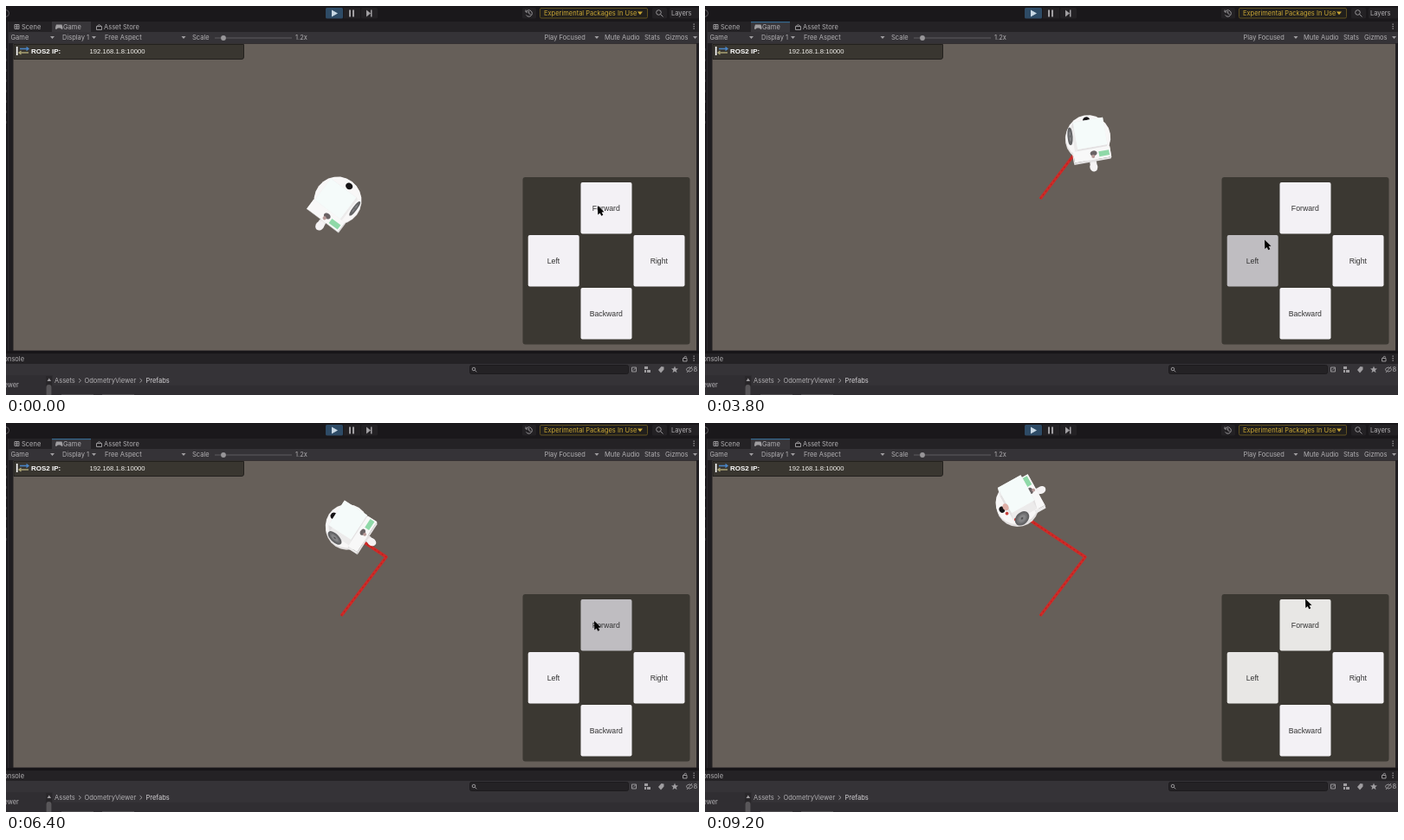
Recreate the animation shown at these times as an HTML page. Size 800x450 px, loop 9.3 s.

```html
<!DOCTYPE html>
<html lang="en">
<head>
<meta charset="utf-8">
<title>Robot odometry viewer</title>
<style>
html, body { margin: 0; width: 100%; height: 100%; overflow: hidden; background: #1a181b; }
svg { display: block; width: 800px; height: 450px; }
text { font: 7.5px Inter, sans-serif; fill: #b2b0b3; white-space: pre; }
.pad text { font: 8.7px "Liberation Sans", Arial, sans-serif; fill: #323232; text-anchor: middle; }
.ip text { font: 7.7px "Liberation Sans", Arial, sans-serif; fill: #f2f0ec; }
.ip .bold { font-weight: bold; font-size: 8px; fill: #fff; }
.line { fill: none; stroke: #989699; stroke-width: 1; }
.icon { fill: #a09ea1; }
</style>
</head>
<body>
<svg viewBox="0 0 800 450">
  <!-- top bar -->
  <rect width="800" height="450" fill="#1a181b"/>
  <path class="line" d="M0 4.500Q3.500 5 3.500 8.500T0 12.500" opacity=".5"/>
  <rect x="369" y="2" width="20" height="12.500" rx="1.500" fill="#2e4b66"/>
  <rect x="390" y="2" width="19" height="12.500" fill="#232124"/>
  <rect x="410" y="2" width="19" height="12.500" rx="1.500" fill="#232124"/>
  <path fill="#c9d8e4" d="M376 4.500L383 8.500L376 12.500Z"/>
  <path class="icon" d="M396 4.500h2v8h-2zM400 4.500h2v8h-2zM416 4.500L421 8.500L416 12.500ZM421 4.500h1.500v8h-1.500z"/>
  <rect x="596" y="2" width="16" height="12.500" rx="1.500" fill="#232124"/>
  <path class="line" d="M600.500 6.500A3.700 3.700 0 1 1 600.500 10.500M600 4.500v2.500h2.500M603.700 6v2.700l2 1"/>
  <rect x="616.500" y="2.500" width="124" height="11.500" rx="1.500" fill="#211f1c" stroke="#5f5020"/>
  <text x="621" y="11" style="fill:#c9a634">Experimental Packages In Use</text>
  <path fill="#c9a634" d="M729 6.500h6l-3 3.800z"/>
  <rect x="746" y="2" width="17" height="12.500" rx="1.500" fill="#232124"/>
  <g class="line"><circle cx="753.500" cy="7.500" r="2.800"/><path d="M755.500 9.500l3 3"/></g>
  <rect x="766" y="2" width="34" height="12.500" rx="1.500" fill="#232124"/>
  <text x="768" y="11">Layers</text>

  <!-- view tabs -->
  <rect x="3" y="18" width="797" height="12" fill="#242225"/>
  <rect x="53" y="18" width="45" height="12" fill="#38363a"/>
  <rect id="focus" x="53" y="18" width="45" height="1.200" fill="#36698f"/>
  <path class="line" d="M10 21.500h5v5h-5zM12.500 21.500v5M10 24h5" stroke-width=".8"/>
  <text x="18" y="27">Scene</text>
  <path class="icon" d="M58 21.500h6.500q2 5.500 0 5.500l-2-1.500h-2.500l-2 1.500q-2 0 0-5.500z"/>
  <text x="66" y="27">Game</text>
  <path class="line" d="M104.500 23.500h6v4h-6zM105.500 23.500q2-4 4 0"/>
  <text x="113" y="27">Asset Store</text>
  <path class="icon" d="M793.500 20.500h1.300v1.300h-1.300zm0 2.500h1.300v1.300h-1.300zm0 2.500h1.300v1.300h-1.300z"/>

  <!-- game toolbar -->
  <rect x="3" y="30" width="797" height="13" fill="#353337"/>
  <path class="icon" d="M51 35h5l-2.500 3zM99 35h5l-2.500 3zM202.500 35h5l-2.500 3zM679.500 35h5l-2.500 3zM793 35h5l-2.500 3z"/>
  <text x="5.500" y="39.200">Game</text>
  <text x="65" y="39.200">Display 1</text>
  <text x="114" y="39.200">Free Aspect</text>
  <text x="215" y="39.200">Scale</text>
  <path d="M241 37h89" stroke="#5f5d60" stroke-width="1.200"/>
  <circle cx="251" cy="37" r="2.900" fill="#989699"/>
  <text x="334" y="39.200">1.2x</text>
  <text x="621.500" y="39.200">Play Focused</text>
  <text x="691" y="39.200">Mute Audio</text>
  <text x="737" y="39.200">Stats</text>
  <text x="761" y="39.200">Gizmos</text>
  <path d="M2.500 18v381" stroke="#2c2a2e"/>
  <path d="M0 49v90" stroke="#4e4c50" stroke-dasharray="3 9"/>

  <!-- game view -->
  <rect x="3" y="43" width="797" height="357" fill="#201e21"/>
  <rect x="8.500" y="43.700" width="788.500" height="354.800" fill="#665f59"/>
  <g class="ip">
    <path d="M9 44.500H274.500V59q0 2.500-2.500 2.500H9z" fill="#393630" stroke="#23211e"/>
    <path d="M12.700 47v10" stroke="#fff" stroke-width="1.600"/>
    <path d="M16 49.500h10m-2.500-2l2.500 2-2.500 2" fill="none" stroke="#4a86c8" stroke-width="1.300"/>
    <path d="M26 54H15m2.500-2l-2.500 2 2.500 2" fill="none" stroke="#a9a374" stroke-width="1.300"/>
    <text class="bold" x="29" y="54.500">ROS2 IP:</text>
    <text x="96.500" y="54.500">192.168.1.8:10000</text>
  </g>

  <g fill="none" stroke-linejoin="round">
    <path id="trail" stroke="#d02a27" stroke-width="3.400"/>
    <path id="marks" stroke="#b42321" stroke-width="1.200" stroke-dasharray="2 3"/>
  </g>
  <g id="robot"></g>

  <g class="pad">
    <rect x="596.500" y="198" width="193" height="193.500" rx="3" fill="#3b3832"/>
    <g id="keys"></g>
  </g>
  <path id="cursor" fill="#050505" d="M0 0L7.500 7.200L4.600 7.600L6.300 10.800L4.300 11.800L2.700 8.600L.3 10.500Z"/>

  <!-- lower panels -->
  <rect y="399" width="800" height="3" fill="#171518"/>
  <rect y="402" width="800" height="12" fill="#242225"/>
  <text x="-8" y="411">Console</text>
  <path class="line" d="M781.500 407.500h4.500v3.500h-4.500zM782.500 407.500q1-4 3.500-1"/>
  <path class="icon" d="M793.500 404.500h1.300v1.300h-1.300zm0 2.500h1.300v1.300h-1.300zm0 2.500h1.300v1.300h-1.300z"/>
  <rect y="414" width="800" height="13" fill="#353337"/>
  <rect x="535.500" y="415.500" width="183" height="10" rx="2" fill="#242225" stroke="#1c1a1d"/>
  <g class="line"><circle cx="540" cy="420" r="1.800"/><path d="M541.300 421.300l2 2"/></g>
  <path class="line" d="M722.500 418h5v5h-5zM724 421.500l3-3"/>
  <path class="icon" d="M737 417h4v3h-4zM740 421h4v3h-4zM737 421h2v3h-2zM753 421l3.500-4 3 .5v3l-3.500 4zM772 416.500l1.100 2.700 2.900.2-2.200 1.900.7 2.900-2.500-1.600-2.500 1.600.7-2.900-2.200-1.900 2.900-.2z"/>
  <path class="line" d="M785 420.500q4-5 8 0q-4 5-8 0M786 424l6-7"/>
  <text x="793.500" y="423.300">8</text>
  <rect y="427" width="800" height="23" fill="#302e32"/>
  <rect x="54" y="427" width="746" height="12" fill="#353337"/>
  <rect x="46" y="428" width="7" height="22" fill="#29272a"/>
  <path class="icon" d="M47.500 434l2.300-3.500 2.300 3.500z"/>
  <rect x="46.500" y="438" width="6" height="14" rx="3" fill="#59575a"/>
  <text x="-2.500" y="441">ewer</text>
  <text x="56" y="436">Assets</text>
  <text x="90.500" y="436">OdometryViewer</text>
  <text x="161.500" y="436" style="fill:#d6d4d7">Prefabs</text>
  <path class="line" d="M84 431l2.500 2.300-2.500 2.300M154.500 431l2.500 2.300-2.500 2.300"/>
  <path d="M64 449.500h37M111 449.500h37" stroke="#525053"/>
</svg>

<script>
const LOOP = 9300, STEP = 100;
const NORMAL = '#f3f1f5', LIT = '#e8e7e5', DOWN = '#bfbdc1';
const $ = id => document.getElementById(id);

// Each row: time, then the values reached at that time.
const BODY = [[450, 383, 225], [2550, 433.5, 155], [3200, 433.5, 155], [3800, 442, 153],
  [4450, 431.5, 146], [5150, 431.5, 146], [7500, 361, 98], [8000, 361, 98], [8850, 360.5, 94]];
const HEADING = [[3200, -53], [3800, -100], [4450, -147], [8000, -147], [8850, -209]];
const GROUND = [[450, 387, 223], [2550, 439, 155], [5150, 439, 155], [7500, 367, 107]];
const POINTER = [[2600, 683, 231], [2950, 646, 270.5], [4500, 646, 270.5], [4950, 679, 229],
  [7600, 679, 229], [7900, 646, 270.5], [8800, 646, 270.5], [9100, 689, 220], [9200, 693, 203.500]];

function track(rows, t) {
  const i = rows.findIndex(r => r[0] > t);
  if (i === 0) return rows[0].slice(1);
  if (i < 0) return rows[rows.length - 1].slice(1);
  const a = rows[i - 1], b = rows[i], k = (t - a[0]) / (b[0] - a[0]);
  return a.slice(1).map((v, n) => v + (b[n + 1] - v) * k);
}

function addKey(name, x, y) {
  $('keys').insertAdjacentHTML('beforeend',
    `<rect id="${name}" x="${x}" y="${y}" width="59" height="59.500" rx="2"/>` +
    `<text x="${x + 29.300}" y="${y + 33}">${name}</text>`);
}
addKey('Forward', 663.500, 204);
addKey('Left', 602.700, 265);
addKey('Right', 724.500, 265);
addKey('Backward', 663.500, 326);

// Model axes: x ahead, y to the right, z up.
function drawRobot(t) {
  const [cx, cy] = track(BODY, t);
  const a = track(HEADING, t)[0] * Math.PI / 180;
  const c = Math.cos(a), s = Math.sin(a);
  const size = 0.95 + (cy - 97) / 128 * 0.1;
  // Taller points lean away from the centre of the camera.
  const ux = (cx - 405) * 0.0047, uy = (cy - 255) * 0.0047;
  const point = ([x, y, z]) =>
    (cx + (x * c - y * s + z * ux) * size).toFixed(1) + ' ' +
    (cy + (x * s + y * c + z * uy) * size).toFixed(1);
  const shape = (pts, fill, extra = '') =>
    `<path d="M${pts.map(point).join('L')}Z" fill="${fill}" ${extra}/>`;
  const quad = (x0, x1, y0, y1, z) => [[x0, y0, z], [x1, y0, z], [x1, y1, z], [x0, y1, z]];
  const ring = f => Array.from({ length: 24 }, (_, i) => f(Math.cos(i * Math.PI / 12), Math.sin(i * Math.PI / 12)));
  const disc = (x, y, z, rx, ry = rx) => ring((p, q) => [x + rx * p, y + ry * q, z]);
  const facing = (nx, ny) => (nx * c - ny * s) * ux + (nx * s + ny * c) * uy < 0;
  const box = (x0, x1, y0, y1, z0, z1, top) => {
    const lo = quad(x0, x1, y0, y1, z0), hi = quad(x0, x1, y0, y1, z1);
    return lo.map((p, i) => {
      const j = (i + 1) % 4;
      return shape([p, lo[j], hi[j], hi[i]], i % 2 ? '#e3e1e2' : '#ecebeb');
    }).join('') + shape(hi, top);
  };
  const wheel = side => {
    const rim = r => ring((p, q) => [4 + r * p, side * 21, 4 + r * q]);
    return shape(rim(8.500), '#747476', 'stroke="#626264" stroke-width="2"') +
      shape(rim(5), '#858587') + shape(rim(1.500), '#505052');
  };
  const near = facing(0, 1) ? 1 : -1, front = facing(1, 0);

  const caster = shape(disc(-30, 1, 1, 5, 4), '#eae8e9') +
    shape(disc(-34, 1, 0, 5.500, 4.500), '#f4f2f3');
  const rear = caster + box(-28, -15, -21, 22, 0, 5, '#f8f8f8') +
    shape(quad(-26, -20, 8, 20, 6), '#8fd9a8') +
    shape(disc(-21, 2, 6, 3, 4), '#6a6365') + shape(disc(-24.500, 1, 6, 2), '#b89a98');
  const nose = shape(disc(20, 1, 3, 3.500, 4), '#161416') +
    shape(disc(11, -17, 2, 2), '#d6332e');
  const body = box(-18, 14, -18, 17, 2, 16, '#f5fbfa');
  const pink = front ? shape(disc(15, 0, 5, 3.500, 4.500), '#dfb0a8') +
    shape(disc(17, -6, 3, 2), '#c8403b') : '';

  $('robot').innerHTML =
    shape(disc(0, 0, -2, 26), '#e3e0e0') + shape(disc(0, 0, 2, 26), '#f8f7f7') +
    (front ? rear + body + nose + pink : nose + body + rear) + wheel(near);
}

function drawTrail(t) {
  const start = GROUND[0].slice(1), bend = GROUND[1].slice(1);
  const pts = t <= 450 ? [] : [start, ...(t > 2550 ? [bend] : []), track(GROUND, t)];
  const d = pts.length ? 'M' + pts.join('L') : '';
  $('trail').setAttribute('d', d);
  $('marks').setAttribute('d', d);
}

function keyColor(t, presses, hoverFrom = LOOP) {
  if (t >= hoverFrom) return LIT;
  for (const [down, up, clear] of presses) {
    if (t >= down && t < up) return DOWN;
    if (t >= up && t < clear) return LIT;
  }
  return NORMAL;
}

function draw(t) {
  drawTrail(t);
  drawRobot(t);
  $('Forward').setAttribute('fill', keyColor(t, [[500, 2600, 3200], [5100, 7500, 8000]], 9000));
  $('Left').setAttribute('fill', keyColor(t, [[3200, 4400, 5100], [8000, 8800, LOOP]]));
  $('Right').setAttribute('fill', NORMAL);
  $('Backward').setAttribute('fill', NORMAL);
  $('focus').setAttribute('opacity', t < 500 ? 0 : 1);
  $('cursor').setAttribute('transform', `translate(${track(POINTER, t)})`);
}

const begin = performance.now();
function tick() {
  const t = (performance.now() - begin) % LOOP;
  draw(Math.floor(t / STEP) * STEP);
  requestAnimationFrame(tick);
}
tick();
</script>
</body>
</html>
```
